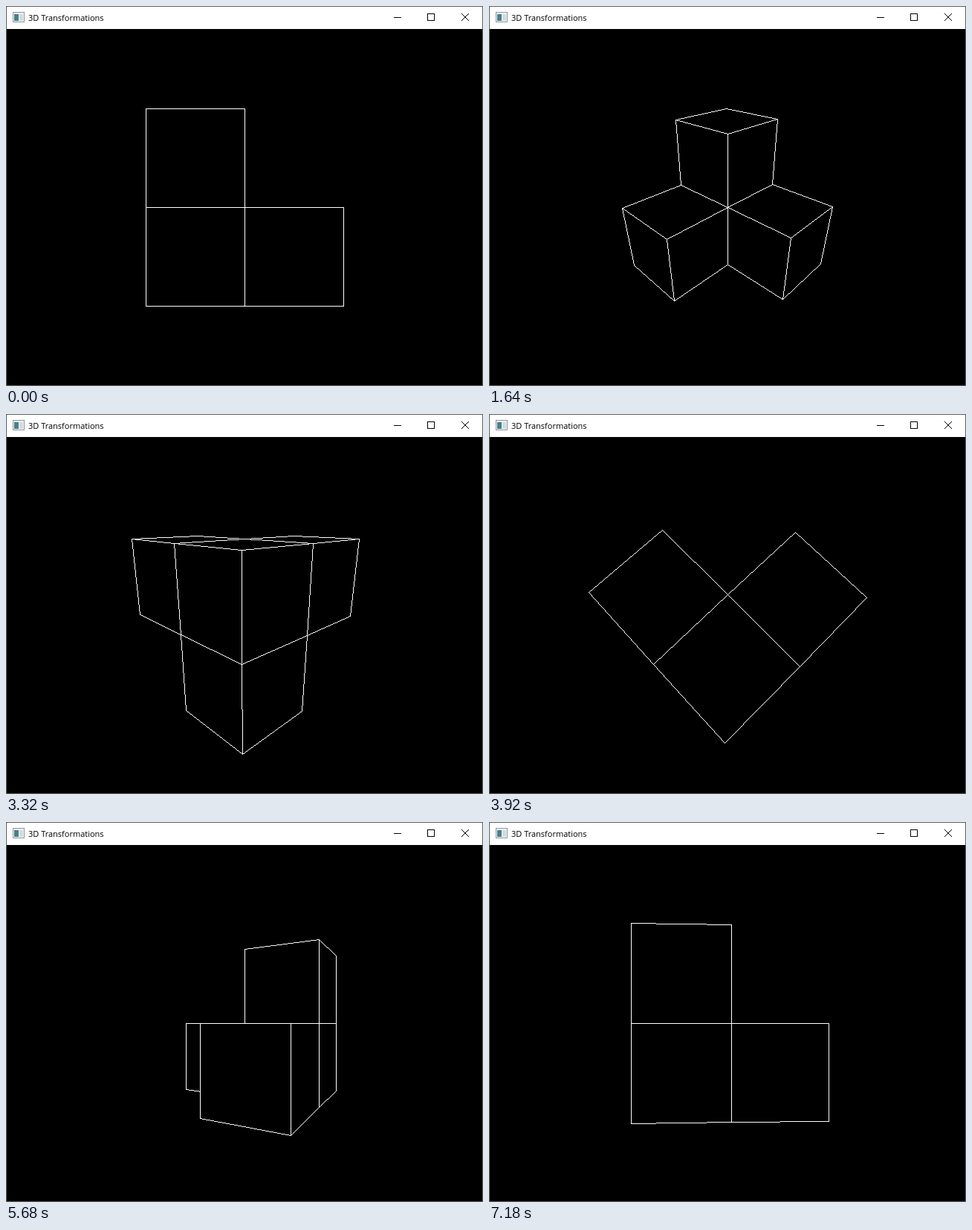
An HTML page with a canvas that plays this animation: 642 px wide and 512 px high, repeating every 7200 ms.

```html
<!DOCTYPE html>
<html lang="en">
<head>
<meta charset="utf-8">
<title>3D Transformations</title>
<style>
  html, body { margin: 0; width: 100%; height: 100%; overflow: hidden; background: #000; }
  canvas { position: absolute; left: 0; top: 0; display: block; }
  #title {
    position: absolute; left: 30px; top: 8px; color: #000; white-space: nowrap;
    font: 11px/15px "Open Sans", "Noto Sans", sans-serif;
  }
</style>
</head>
<body>
<canvas id="stage" width="642" height="512"></canvas>
<div id="title">3D Transformations</div>
<script>
const ctx = document.getElementById('stage').getContext('2d');
const STEP_MS = 20, STEPS = 360, DEG_PER_STEP = 2;
const TILT_START = 67, TILT_STEPS = 180;
const CX = 321, CY = 271, FOCAL = 400, EYE = 4;

// Lowest corner of each unit cube: the hub and its three arms.
const CUBES = [[-1, -1, 0], [-1, 0, 0], [0, -1, 0], [-1, -1, -1]];

function rect(x, y, w, h, color) {
  ctx.fillStyle = color;
  ctx.fillRect(x, y, w, h);
}

function drawWindow() {
  rect(0, 0, 642, 512, '#5f5f5f');
  rect(1, 1, 640, 30, '#fff');

  rect(9, 8, 16, 14, '#8d9499');
  rect(10, 9, 14, 12, '#f3f5f6');
  rect(11, 11, 6, 9, '#47808a');
  rect(18, 11, 5, 9, '#d5dadd');

  rect(522, 15, 10, 1, '#000');
  ctx.strokeStyle = '#000';
  ctx.lineWidth = 1;
  ctx.strokeRect(567.5, 10.5, 9, 9);
  ctx.beginPath();
  ctx.moveTo(613, 10);
  ctx.lineTo(623, 20);
  ctx.moveTo(623, 10);
  ctx.lineTo(613, 20);
  ctx.stroke();
}

// Spin about the vertical axis, pause it for one full tilt, then finish the spin.
function pose(step) {
  const tilt = Math.min(Math.max(step - TILT_START, 0), TILT_STEPS);
  const rad = n => n * DEG_PER_STEP * Math.PI / 180;
  return { spin: rad(step - tilt), tilt: rad(tilt) };
}

// Integer line; endpoints are ordered so shared edges cover the same pixels.
function tracePixels(a, b, plot) {
  if (a[0] > b[0] || (a[0] === b[0] && a[1] > b[1])) [a, b] = [b, a];
  let [x, y] = a;
  const dx = b[0] - x, dy = Math.abs(b[1] - y), sy = b[1] > y ? 1 : -1;
  let err = dx - dy;
  for (;;) {
    plot(x, y);
    if (x === b[0] && y === b[1]) return;
    const e2 = 2 * err;
    if (e2 > -dy) { err -= dy; x++; }
    if (e2 < dx) { err += dx; y += sy; }
  }
}

function drawFace(points) {
  const rows = new Map(), pixels = [];
  points.forEach((p, i) => tracePixels(p, points[(i + 1) % 4], (x, y) => {
    pixels.push([x, y]);
    const row = rows.get(y);
    if (!row) rows.set(y, [x, x]);
    else {
      row[0] = Math.min(row[0], x);
      row[1] = Math.max(row[1], x);
    }
  }));
  ctx.fillStyle = '#000';
  rows.forEach(([lo, hi], y) => ctx.fillRect(lo, y, hi - lo + 1, 1));
  ctx.fillStyle = '#fff';
  pixels.forEach(([x, y]) => ctx.fillRect(x, y, 1, 1));
}

function drawScene(step) {
  rect(1, 31, 640, 480, '#000');
  const { spin, tilt } = pose(step);
  const cs = Math.cos(spin), ss = Math.sin(spin);
  const ct = Math.cos(tilt), st = Math.sin(tilt);
  const eye = [EYE * ct * ss, EYE * st, EYE * ct * cs];

  const project = ([x, y, z]) => {
    const rx = x * cs - z * ss, rz = x * ss + z * cs;
    const scale = FOCAL / (EYE - (y * st + rz * ct));
    return [Math.round(CX + rx * scale), Math.round(CY - (y * ct - rz * st) * scale)];
  };
  const distance = cube =>
    cube.reduce((sum, c, i) => sum + Math.abs(c + 0.5 - eye[i]), 0);

  const ordered = [...CUBES].sort((a, b) => distance(b) - distance(a));
  for (const cube of ordered) {
    for (let axis = 0; axis < 3; axis++) {
      for (const side of [0, 1]) {
        const facing = (eye[axis] - cube[axis] - side) * (side ? 1 : -1);
        if (facing < 1e-9) continue;
        const u = (axis + 1) % 3, v = (axis + 2) % 3;
        drawFace([[0, 0], [1, 0], [1, 1], [0, 1]].map(([du, dv]) => {
          const p = [...cube];
          p[axis] += side;
          p[u] += du;
          p[v] += dv;
          return project(p);
        }));
      }
    }
  }
}

const start = performance.now();
let shown = -1;

function tick() {
  const step = Math.floor((performance.now() - start) / STEP_MS) % STEPS;
  if (step !== shown) {
    shown = step;
    drawScene(step);
  }
  requestAnimationFrame(tick);
}

drawWindow();
tick();
</script>
</body>
</html>
```
